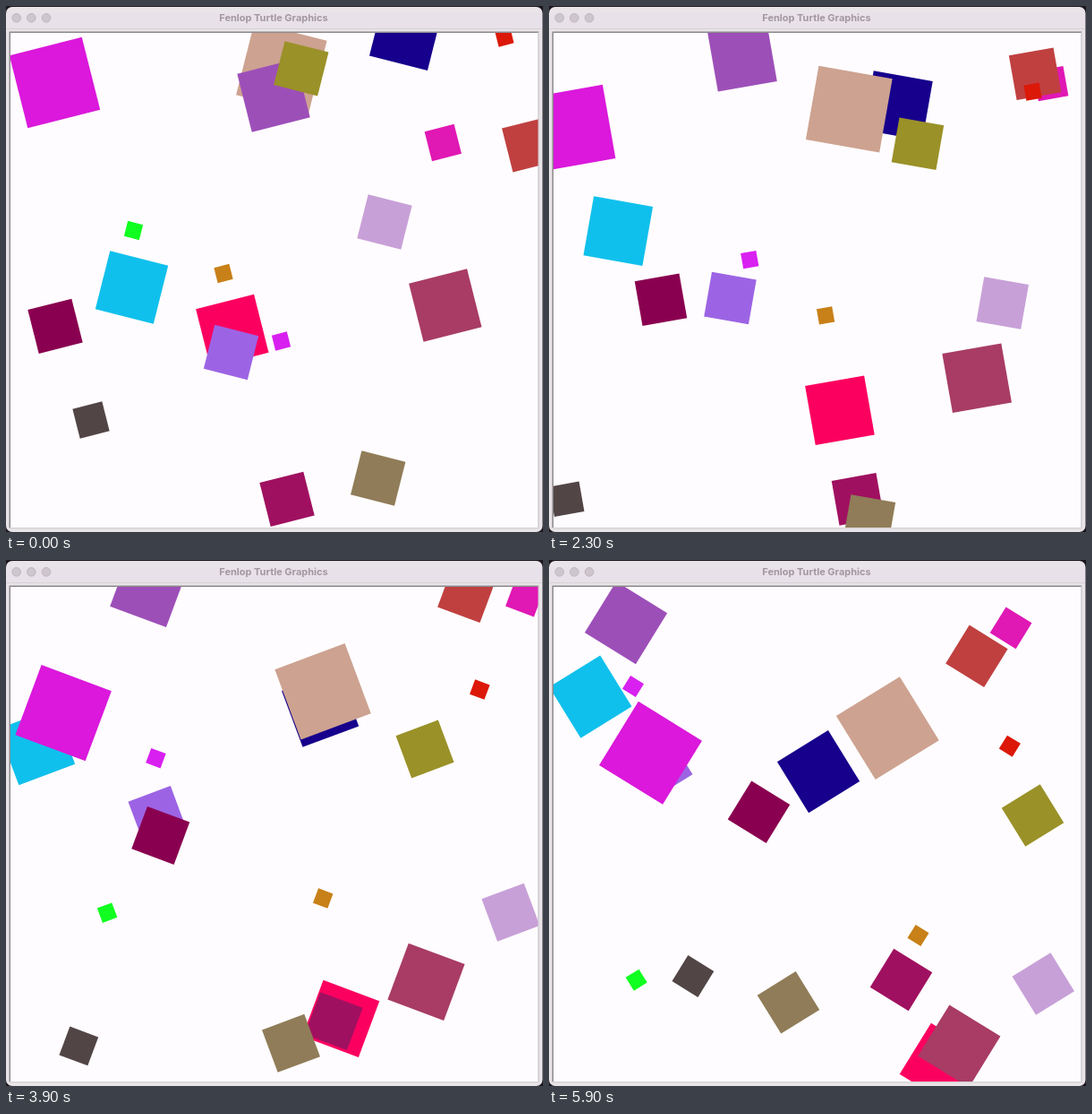
An HTML page with a canvas for the animation above (6000 ms loop, 600 by 587 pixels).

```html
<!DOCTYPE html>
<html lang="en">
<head>
<meta charset="utf-8">
<title>Drifting squares</title>
<style>
  html, body { margin: 0; width: 100%; height: 100%; overflow: hidden; }
  canvas { display: block; }
</style>
</head>
<body>
<canvas id="stage" width="600" height="587"></canvas>
<script>
const ctx = document.getElementById('stage').getContext('2d');
const STEP = 100, STEPS = 60;
const WALL = { left: 12.3, right: 595, top: 29.6, bottom: 576.5 };

// Uneven pace: [step, distance travelled in steps, turn in degrees]
const PACE = [
  [0, 0, 14.2], [8, 8.1, 45.2], [16, 16.05, 75.2], [23, 23, 100],
  [32, 31.6, 131.6], [45, 44.8, 183.5], [59, 59, 238.3]
];

// Back to front: colour, size, spin direction, x, y, x speed, y speed
const SQUARES = [
  ['#fc0060', 4, -1, 252.8, 362.5, 3.136, 3.86],
  ['#9c64e4', 3, 1, 251.5, 386.5, -2.132, -2.634],
  ['#e018b4', 2, -1, 488.3, 152.5, 3.146, -2.866],
  ['#c04040', 3, -1, 584.7, 154.8, -1.81, -3.44],
  ['#dc1808', 1, -1, 556.9, 35, -0.713, -3.11],
  ['#16008c', 4, 1, 446.7, 31.2, -2.469, 3.475],
  ['#cda290', 5, 1, 307.8, 69, 1.195, 2.01],
  ['#9d4fb8', 4, -1, 299, 100, -3.61, -1.88],
  ['#9a9128', 3, 1, 329.8, 69.8, 3.571, 3.647],
  ['#10c0ec', 4, 1, 140.5, 314, -2.75, -2.734],
  ['#10ff20', 1, 1, 142.5, 250.5, -0.76, 3.698],
  ['#8a0050', 3, -1, 55, 357.3, 3.042, -1.288],
  ['#db18db', 5, -1, 54.5, 85.5, -2.43, 2.2],
  ['#a01060', 3, -1, 314, 550.3, 1.347, 2.275],
  ['#907c58', 3, 1, 415.7, 527, -2.512, 2.24],
  ['#a83c64', 4, -1, 490.8, 334, -0.551, 3.534],
  ['#c8a0d8', 3, 1, 423, 241, 3.64, 3.932],
  ['#c88018', 1, -1, 243, 298.5, 2.873, 2.042],
  ['#d820f0', 1, -1, 307.5, 374, -3.619, -3.949],
  ['#524545', 2, -1, 95, 462, -3.92, 3.839]
];

const bounce = (v, lo, hi) => v < lo ? 2 * lo - v : v > hi ? 2 * hi - v : v;

function paceAt(step) {
  const i = PACE.findIndex(key => key[0] >= step);
  if (i === 0) return PACE[0].slice(1);
  const [a, b] = [PACE[i - 1], PACE[i]];
  const k = (step - a[0]) / (b[0] - a[0]);
  return [1, 2].map(j => a[j] + (b[j] - a[j]) * k);
}

function box(color, x, y, w, h) {
  ctx.fillStyle = color;
  ctx.fillRect(x, y, w, h);
}

function drawWindow() {
  box('#1c161e', 0, 0, 600, 587);
  ctx.fillStyle = '#e8e4e8';
  ctx.beginPath();
  ctx.roundRect(0, 1, 599.5, 586, 7);
  ctx.fill();
  box('#e9e1e9', 1, 8, 598, 17);
  box('#d6d0d6', 0, 25, 599, 1);

  ctx.fillStyle = '#cdc6cc';
  ctx.strokeStyle = '#bdb6bd';
  ctx.lineWidth = 1;
  for (const x of [11.7, 28.3, 45]) {
    ctx.beginPath();
    ctx.arc(x, 13.3, 4.8, 0, 7);
    ctx.fill();
    ctx.stroke();
  }

  ctx.fillStyle = '#a3979f';
  ctx.font = '700 11px Inter, sans-serif';
  ctx.textAlign = 'center';
  ctx.fillText('Fenlop Turtle Graphics', 299, 17);

  box('#8c888c', 3.5, 28.5, 592, 554);
  box('#d8d4d8', 594.5, 29, 1.5, 554);
  box('#d8d4d8', 4, 582, 592, 1.5);
  box('#fefcfe', 5, 30, 589.5, 552);
}

function draw(now) {
  const step = Math.floor(now / STEP) % STEPS;
  const [travel, turn] = paceAt(step);
  drawWindow();
  ctx.save();
  ctx.beginPath();
  ctx.rect(5, 30, 589.5, 552);
  ctx.clip();
  for (const [color, size, spin, x, y, vx, vy] of SQUARES) {
    const side = size * 16.5 + 1;
    ctx.save();
    ctx.translate(
      bounce(x + vx * travel, WALL.left, WALL.right),
      bounce(y + vy * travel, WALL.top, WALL.bottom)
    );
    ctx.rotate(spin * turn * Math.PI / 180);
    box(color, -side / 2, -side / 2, side, side);
    ctx.restore();
  }
  ctx.restore();
}

const start = performance.now();
function tick() {
  draw(performance.now() - start);
  requestAnimationFrame(tick);
}
tick();
</script>
</body>
</html>
```
